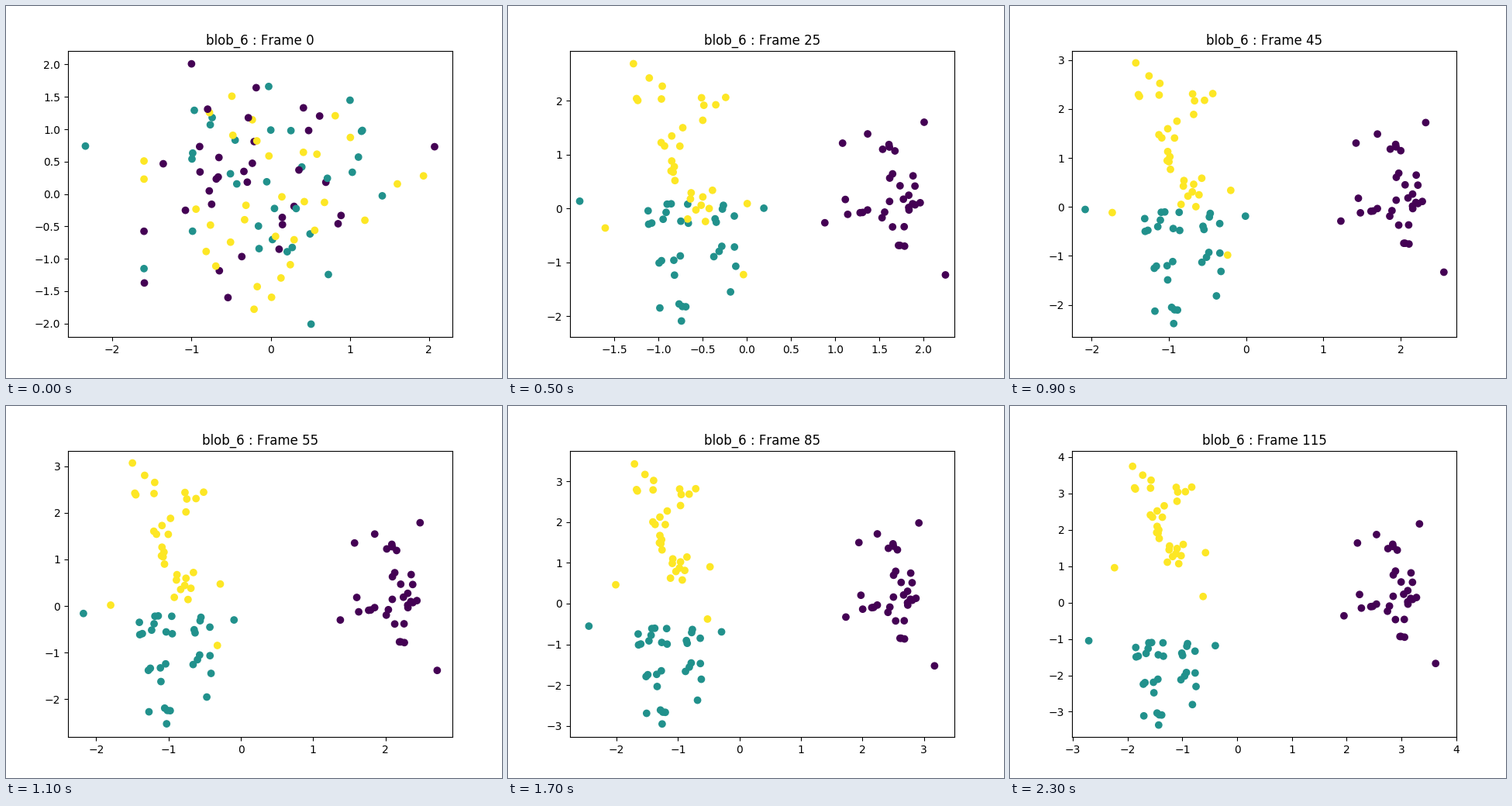
Recreate the animation shown at these times as a matplotlib script. Size 640 by 480 pixels, loop 2.4 s.

```python
import numpy as np
import matplotlib.pyplot as plt
from matplotlib.animation import FuncAnimation

FRAMES, STEP = 24, 5
SETTLED, MID = 15, 65
rng = np.random.default_rng(6)
plt.rcParams["text.kerning_factor"] = 6


def by_x(points):
    return points[np.argsort(points[:, 0])]


def scatter_left(epoch):
    return max(0, 1 - epoch / SETTLED) ** 2


class Blob:
    """Dots that start mixed with the others, then drift as one cluster."""

    def __init__(self, count, hubs, edges, start_edges, centre, speed, accel):
        # dots gather round the hubs in turn; edges stand alone
        n = count - len(edges)
        mid = np.resize(hubs, (n, 2)) + rng.uniform(-1, 1, (n, 2)) * (0.16, 0.26)
        self.mid = by_x(np.vstack([edges, mid]))

        n = count - len(start_edges)
        cloud = rng.normal((0, 0.1), (0.72, 0.85), (n, 2))
        cloud = np.clip(cloud, (-1.6, -1.6), (1.6, 1.85))
        self.start = by_x(np.vstack([start_edges, cloud]))

        # (drift, stretch about the centre) for each order of motion
        off = self.mid - centre
        self.vel = np.array(speed[0]) + off * speed[1]
        self.acc = np.array(accel[0]) + off * accel[1]

    def pose(self, epoch):
        s = (max(epoch, SETTLED) - MID) / 50
        cluster = self.mid + self.vel * s + self.acc * s * s
        return cluster + (self.start - cluster) * scatter_left(epoch)


purple = Blob(34,
              hubs=[(2.15, 1.35), (2.4, .55), (2.3, -.05), (1.88, 0), (2.3, -.6), (2.6, .1)],
              edges=[(1.51, -.31), (1.71, 1.4), (2.63, 1.85), (2.87, -1.43)],
              start_edges=[(2.07, .73), (-1, 2.01)],
              centre=(2.2, 0),
              speed=((.70, 0), (.1, .17)), accel=((-.10, 0), (.13, 0)))
teal = Blob(33,
            hubs=[(-1.4, -.5), (-1.15, -.55), (-.65, -.5), (-1.25, -1.6), (-.6, -1.4), (-1.2, -2.35)],
            edges=[(-2.27, -.28), (-.17, -.42), (-1.11, -2.67), (-.55, -2.09)],
            start_edges=[(-2.34, .74), (.51, -2.01)],
            centre=(-1, -1.2),
            speed=((-.395, -.66), (.05, .035)), accel=((.085, -.08), (.05, -.065)))
yellow = Blob(33,
              hubs=[(-1.38, 2.75), (-.7, 2.35), (-1.18, 1.9), (-1.22, 1.2), (-.82, .75), (-.87, .4)],
              edges=[(-1.57, 3.19), (-1.87, .16), (-.4, -.7), (-.36, .61)],
              start_edges=[(1.93, .28), (-.21, -1.78)],
              centre=(-1, 1.4),
              speed=((-.35, .67), (0, -.04)), accel=((.07, .03), (.1, -.04)))
blobs = [purple, teal, yellow]

# each axis limit passes through these epochs
epochs = [0, 15, 35, 45, 65, 85, 115]
left = [-2.56, -1.886, -2.113, -2.254, -2.528, -2.757, -3.013]
right = [2.295, 2.193, 2.506, 2.723, 3.130, 3.498, 4.003]
bottom = [-2.21, -2.275, -2.504, -2.659, -2.965, -3.274, -3.697]
top = [2.214, 2.809, 3.045, 3.194, 3.474, 3.749, 4.178]

fig, ax = plt.subplots(figsize=(6.4, 4.8), dpi=100)
labels = np.repeat([0, 1, 2], [len(b.mid) for b in blobs])
order = rng.permutation(len(labels))
dots = ax.scatter(*np.zeros((2, len(labels))), c=labels[order], cmap="viridis")


def update(i):
    epoch = i * STEP
    dots.set_offsets(np.vstack([b.pose(epoch) for b in blobs])[order])
    ax.set_xlim(np.interp(epoch, epochs, left), np.interp(epoch, epochs, right))
    ax.set_ylim(np.interp(epoch, epochs, bottom), np.interp(epoch, epochs, top))
    ax.set_title(f"blob_6 : Frame {epoch}")
    return [dots]


anim = FuncAnimation(fig, update, frames=FRAMES, interval=100, repeat=True,
                     repeat_delay=0, blit=False)
plt.show()
```
